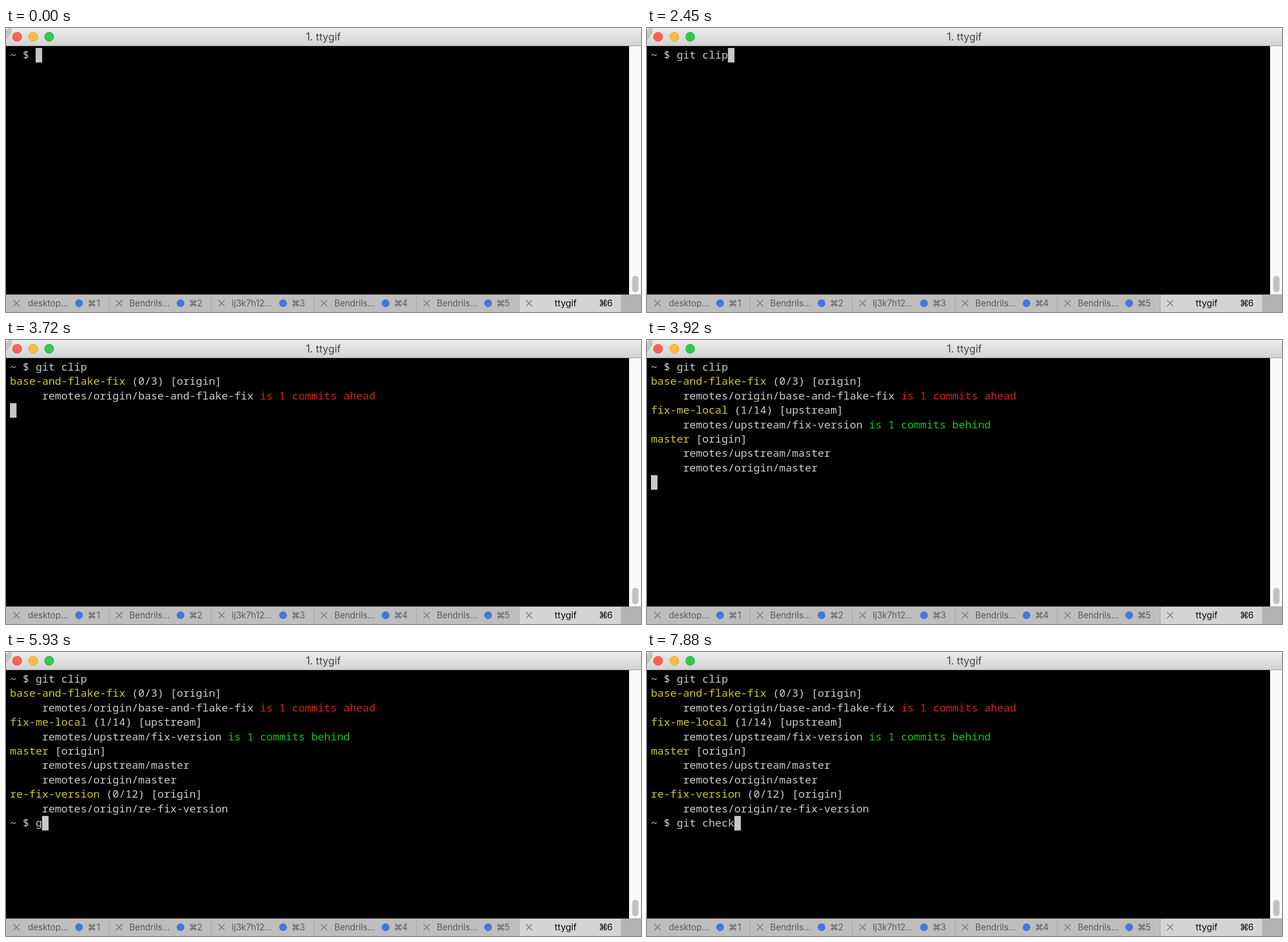
An HTML page for the animation above (8 s loop, 1118 by 501 pixels).

```html
<!DOCTYPE html>
<html lang="en">
<head>
<meta charset="utf-8">
<title>Terminal</title>
<style>
  html, body { margin: 0; width: 100%; height: 100%; overflow: hidden; background: #fff; }
  svg { display: block; width: 1118px; height: 501px; }
  text { white-space: pre; }
  .ui { font-family: Inter, Roboto, sans-serif; font-size: 15.2px; fill: #585858; }
  .ui .title { font-size: 18px; fill: #444; }
  .ui .on { font-size: 15.8px; fill: #0c0c0c; }
  .mid { text-anchor: middle; }
  .cross { stroke: #707070; stroke-width: 1.2; fill: none; }
  #term { font-family: "Noto Sans Mono", "DejaVu Sans Mono", monospace; font-size: 18.82px; font-weight: 500; fill: #cdcdcd; }
  .y { fill: #cdc92a; }
  .r { fill: #d8201b; }
  .g { fill: #0cc424; }
</style>
</head>
<body>
<svg viewBox="0 0 1118 501">
  <defs>
    <linearGradient id="bar" x2="0" y2="1">
      <stop stop-color="#ededed"/>
      <stop offset="1" stop-color="#d2d2d2"/>
    </linearGradient>
  </defs>
  <rect width="1118" height="501"/>
  <rect width="1118" height="32" fill="#fff"/>
  <path d="M0 32V7Q0 0 7 0H1111Q1118 0 1118 7V32Z" fill="url(#bar)"/>
  <path d="M4 0H10V8L0 22V7Q0 3 4 0Z" fill="#c3c3c3"/>
  <rect y="31" width="1118" height="1" fill="#a0a0a0"/>
  <circle cx="19.5" cy="15.5" r="8" fill="#fc605b" stroke="#e4514b"/>
  <circle cx="48" cy="15.5" r="8" fill="#fdbc40" stroke="#e0a43a"/>
  <circle cx="76" cy="15.5" r="8" fill="#34c84a" stroke="#2db041"/>
  <rect x="1097" y="32" width="21" height="438" fill="#fafafa"/>
  <rect x="1102.5" y="437" width="11" height="29" rx="5.5" fill="#c1c1c1"/>
  <rect y="470" width="1118" height="31" fill="#bebebe"/>
  <rect x="903" y="470" width="180" height="31" fill="#d4d4d4"/>
  <rect x="1083" y="470" width="35" height="31" fill="#b3b3b3"/>
  <rect y="470" width="1118" height="1" fill="#a0a0a0"/>
  <g class="ui" id="ui"><text class="title mid" x="558.7" y="22.2">1. ttygif</text></g>
  <g id="term"></g>
  <rect id="cursor" width="11.5" height="25.6" fill="#c7c7c7"/>
</svg>
<script>
const LOOP = 8000, LEFT = 7, TOP = 35.2, CELL = 11.29, LINE = 25.4;
const PROMPT = '~ $ ', INDENT = '     remotes/';
const $ = id => document.getElementById(id);

function add(parent, tag, attrs, text = '') {
  const el = document.createElementNS('http://www.w3.org/2000/svg', tag);
  for (const k in attrs) el.setAttribute(k, attrs[k]);
  el.textContent = text;
  return parent.appendChild(el);
}

// Tab strip
const ui = $('ui');
const tabs = ['desktop...', 'Bendrils...', 'lj3k7h12...', 'Bendrils...', 'Bendrils...', 'ttygif'];
tabs.forEach((name, i) => {
  const x = i * 180.5, shift = i ? x - 1.9 : 0, active = i === 5;
  const tone = active ? 'on' : '';
  if (i) add(ui, 'rect', { x: Math.round(x), y: 471, width: 1, height: 30, fill: '#a4a4a4' });
  add(ui, 'path', { class: 'cross', d: `M${x + 13} 480l11 11m0 -11l-11 11` });
  add(ui, 'text', { class: tone, x: active ? 966 : 38.5 + shift, y: 491 }, name);
  if (!active) add(ui, 'circle', { cx: 128.7 + shift, cy: 485.5, r: 6.8, fill: '#4176e0' });
  add(ui, 'text', { class: tone + ' mid', x: 151 + shift, y: 491 }, '⌘');
  add(ui, 'text', { class: tone + ' mid', x: 162.5 + shift, y: 491 }, i + 1);
});

// Terminal rows: pairs of text and colour class
const rows = [
  [PROMPT],
  ['base-and-flake-fix', 'y', ' (0/3) [origin]'],
  [INDENT + 'origin/base-and-flake-fix ', '', 'is 1 commits ahead', 'r'],
  ['fix-me-local', 'y', ' (1/14) [upstream]'],
  [INDENT + 'upstream/fix-version ', '', 'is 1 commits behind', 'g'],
  ['master', 'y', ' [origin]'],
  [INDENT + 'upstream/master'],
  [INDENT + 'origin/master'],
  ['re-fix-version', 'y', ' (0/12) [origin]'],
  [INDENT + 'origin/re-fix-version'],
  [PROMPT]
].map((parts, i) => {
  const row = add($('term'), 'text', { x: LEFT, y: 54 + i * LINE });
  for (let p = 0; p < parts.length; p += 2)
    add(row, 'tspan', { class: parts[p + 1] || '' }, parts[p]);
  return row;
});

const commands = [
  { row: 0, text: 'git clip', keys: [1260, 1360, 1470, 1570, 1810, 1910, 2150, 2450] },
  { row: 10, text: 'git check', keys: [5930, 6020, 6120, 6280, 7350, 7500, 7600, 7780, 7880] }
];
const output = [[3590, 1], [3650, 2], [3720, 3], [3820, 5], [3920, 8], [4020, 10]];
const READY = 4120;

function draw(t) {
  let line = 0, col = 0;
  for (const [at, n] of output) if (t >= at) line = n;
  const prompt = t < output[0][0] || t >= READY;
  rows.forEach((row, i) => {
    row.style.display = i < line || (i === line && prompt) ? '' : 'none';
  });
  for (const { row, text, keys } of commands) {
    const typed = PROMPT + text.slice(0, keys.filter(k => t >= k).length);
    rows[row].firstChild.textContent = typed;
    if (prompt && row === line) col = typed.length;
  }
  $('cursor').setAttribute('x', LEFT + col * CELL);
  $('cursor').setAttribute('y', TOP + line * LINE);
}

const start = performance.now();
function tick() {
  draw((performance.now() - start) % LOOP);
  requestAnimationFrame(tick);
}
tick();
</script>
</body>
</html>
```
